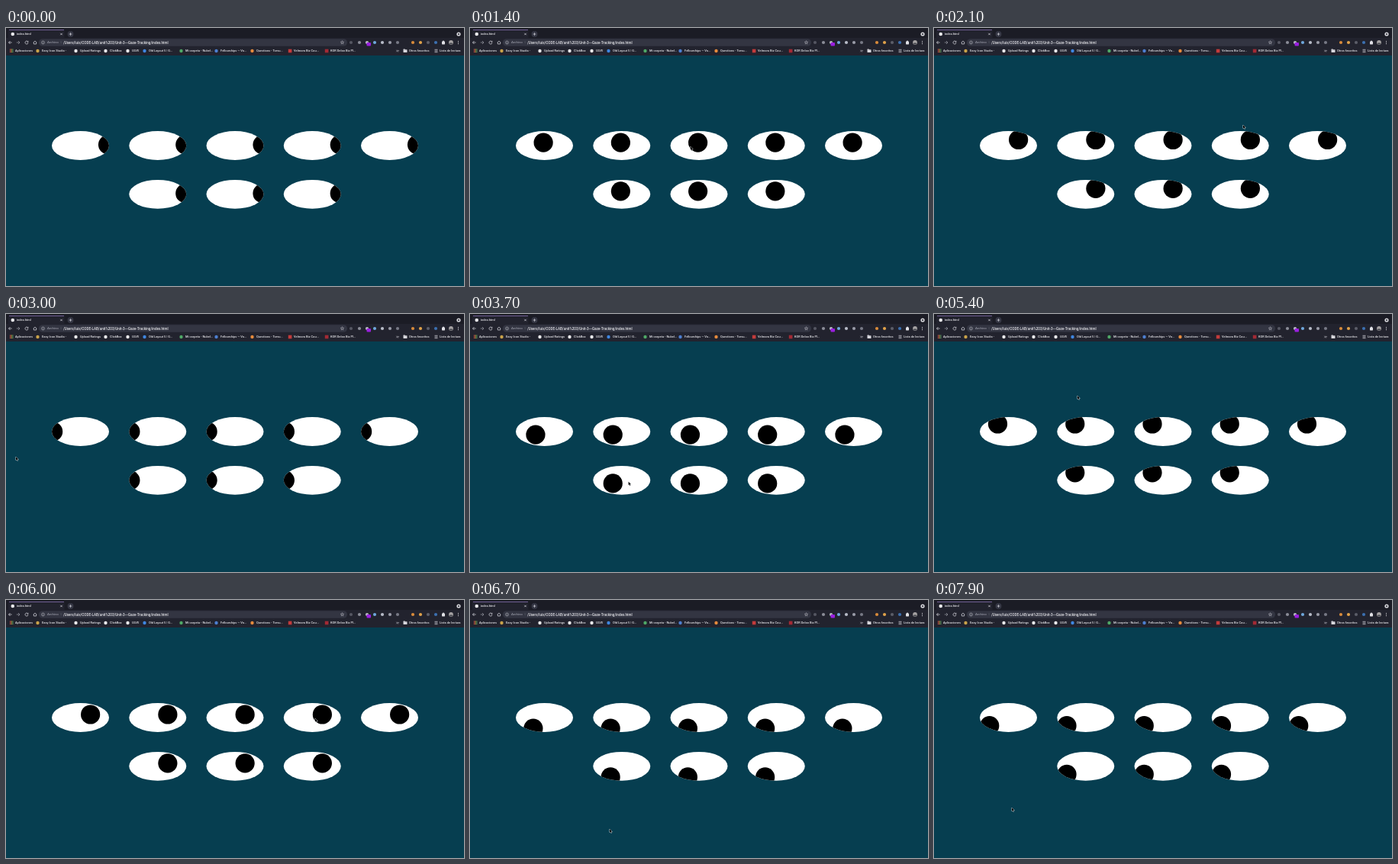
Write an HTML page with a canvas that moves like this. It is 600 by 338 pixels and loops after 8 s.

```html
<!DOCTYPE html>
<html lang="es">
<head>
<meta charset="utf-8">
<title>Eyes</title>
<style>
html, body { margin: 0; width: 100%; height: 100%; overflow: hidden; background: #063e50; }
canvas { display: block; width: 600px; height: 338px; }
</style>
</head>
<body>
<canvas id="stage"></canvas>
<script>
const W = 600, H = 338, TOP = 36, LOOP = 8000, STEP = 100;
const TAU = Math.PI * 2;
const canvas = document.getElementById('stage');
const ctx = canvas.getContext('2d');
const scale = window.devicePixelRatio || 1;
canvas.width = W * scale;
canvas.height = H * scale;
ctx.scale(scale, scale);

// Pointer waypoints: time, x, y
const path = [
  [0, 588, 178], [500, 500, 182], [1000, 345, 178], [1500, 290, 150],
  [2100, 405, 127], [2500, 205, 138], [3000, 13, 187], [3300, 45, 245],
  [3600, 75, 228], [3800, 356, 212], [3900, 356, 212], [4400, 409, 187],
  [4800, 300, 236], [5100, 170, 185], [5400, 188, 107], [5700, 310, 92],
  [6000, 405, 155], [6100, 405, 155], [6400, 325, 260], [6700, 183, 300],
  [7000, 108, 220], [7300, 220, 190], [7600, 225, 312], [7900, 102, 272]
];

function pointerAt(t) {
  let i = 0;
  while (i < path.length - 2 && t >= path[i + 1][0]) i++;
  const a = path[i], b = path[i + 1];
  const before = path[Math.max(0, i - 1)], after = path[Math.min(path.length - 1, i + 2)];
  const span = b[0] - a[0], u = Math.min(1, (t - a[0]) / span);
  const u2 = u * u, u3 = u2 * u;
  return [1, 2].map(k => {
    const m0 = (b[k] - before[k]) / (b[0] - before[0]) * span;
    const m1 = (after[k] - a[k]) / (after[0] - a[0]) * span;
    return (2 * u3 - 3 * u2 + 1) * a[k] + (u3 - 2 * u2 + u) * m0
      + (3 * u2 - 2 * u3) * b[k] + (u3 - u2) * m1;
  });
}

function rect(x, y, w, h, color, r = 0) {
  ctx.fillStyle = color;
  ctx.beginPath();
  ctx.roundRect(x, y, w, h, r);
  ctx.fill();
}

function dot(x, y, r, color) {
  ctx.fillStyle = color;
  ctx.beginPath();
  ctx.arc(x, y, r, 0, TAU);
  ctx.fill();
}

function text(str, x, y, size = 4, color = '#e6e6ea', weight = 500) {
  ctx.fillStyle = color;
  ctx.font = `${weight} ${size}px Roboto, sans-serif`;
  ctx.textBaseline = 'middle';
  ctx.fillText(str, x, y);
}

function stroke(d, x, y, color = '#dcdce2', width = 0.7) {
  ctx.save();
  ctx.translate(x, y);
  ctx.strokeStyle = color;
  ctx.lineWidth = width;
  ctx.stroke(new Path2D(d));
  ctx.restore();
}

const bookmarks = [
  ['Aplicaciones', 12, '#e0524a'], ['Easy Icon Studio -', 47, '#c9a24a'],
  ['Upload Ratings', 97, '#e8e8ea'], ['ClickBox', 136, '#e8e8ea'],
  ['ULVE', 165, '#e8e8ea'], ['Old Layout 5 | G...', 187, '#3f86e0'],
  ['Mi carpeta - Nubel...', 235, '#4fa866'], ['Fellowships — Vo...', 281, '#4d7fd0'],
  ['Questions - Torvu...', 328, '#e58a3c'], ['Velmora Biz Cou...', 377, '#c33b3b'],
  ['KOR Delan Biz Pl...', 425, '#a32a35']
];

const extensions = [
  [452, '#555762'], [463, '#8b8d98'], [473, '#b9bac4'], [483, '#6fa8dc'],
  [493, '#b8bcc8'], [503, '#9a9ca8'], [513, '#777985'], [533, '#d98b3a'],
  [543, '#e0a24a'], [553, '#5c5e69'], [563, '#3c70b0']
];

function drawTabs() {
  rect(0, 0, W, 14, '#1b1c25');
  rect(3, 2, 73.5, 12, '#22232e', 1.5);
  rect(4, 2, 72, 0.8, '#8d74b8');
  dot(8.8, 8, 2.3, '#e8e8ea');
  text('index.html', 14, 8.2);
  stroke('M-1.2-1.2L1.2 1.2M1.2-1.2L-1.2 1.2', 72.5, 8);
  dot(84.5, 8, 4, '#343643');
  stroke('M-1.8 0H1.8M0-1.8V1.8', 84.5, 8);
  dot(593, 8, 2.6, '#d5d5da');
  dot(593, 8, 1, '#1b1c25');
}

function drawToolbar() {
  const y = 19;
  rect(0, 13, W, TOP - 13, '#22232e');
  stroke('M2.2 0H-2M0-2L-2 0L0 2', 5.5, y);
  stroke('M-2.2 0H2M0-2L2 0L0 2', 16, y, '#9d9ea8');
  stroke('M1.6-1.2A2 2 0 1 0 2 .4M2-2.2V-.7H.5', 27, y);
  stroke('M-2.3 .1L0-2L2.3 .1M-1.6-.2V2H1.6V-.2', 38, y);

  rect(43, 14.2, 404, 9.6, '#333542', 4.8);
  stroke('M2 0A2 2 0 1 1-2 0A2 2 0 1 1 2 0M0-.3V1.2M0-1.2V-.8', 48.5, y, '#b8b9c2', 0.6);
  text('Archivo', 54, 19.2, 4.4, '#a9abb7', 400);
  text('|', 71.5, 19.2, 4.4, '#777985', 400);
  text('/Users/luis/CODE-LAB/unit%203/Unit-3---Gaze-Tracking/index.html', 75, 19.2, 4.55);
  stroke('M0-2.3L.6-.7L2.2-.7L.9 .4L1.4 2L0 1L-1.4 2L-.9 .4L-2.2-.7L-.6-.7Z', 440.5, y, '#c8c9d0', 0.5);

  for (const [x, color] of extensions) dot(x, y, 2.1, color);
  rect(472.5, 19, 5.5, 4.5, '#9a1fe0', 1);
  rect(571, 17.6, 4, 3.8, '#e1e1e6', 0.6);
  dot(573, 17.4, 1, '#e1e1e6');
  dot(583, y, 2.9, '#a6a3a4');
  rect(581, 19.5, 4, 2, '#44464e', 1);
  for (let k = -1; k <= 1; k++) dot(592.5, y + k * 1.7, 0.55, '#dcdce2');
}

function drawBookmarks() {
  const y = 30;
  bookmarks.forEach(([label, x, color], i) => {
    if (i === 0) {
      const tints = ['#e0524a', '#e7b840', '#58ad68'];
      for (let k = 0; k < 9; k++) {
        rect(5 + k % 3 * 1.7, y - 2.4 + Math.floor(k / 3) * 1.7, 1.1, 1.1, tints[k % 3]);
      }
    } else if (i > 8) {
      rect(x - 7.2, y - 2.3, 4.6, 4.6, color);
    } else {
      dot(x - 5.5, y, 2.2, color);
    }
    text(label, x, y + 0.2);
  });
  stroke('M-1.5-1.2L-.3 0L-1.5 1.2M.3-1.2L1.5 0L.3 1.2', 513, y);
  rect(520.5, 28.3, 5, 3.8, '#d8d8dd', 0.5);
  rect(520.5, 27.6, 2.3, 1.2, '#d8d8dd', 0.3);
  text('Otros favoritos', 528, y + 0.2);
  stroke('M-2-1.7H2M-2 0H2M-2 1.7H2', 563.5, y);
  text('Lista de lectura', 568, y + 0.2);
}

function drawEye(left, top, fx, fy) {
  const w = 75, h = 37.8;
  ctx.save();
  ctx.beginPath();
  ctx.ellipse(left + w / 2, top + h / 2, w / 2, h / 2, 0, 0, TAU);
  ctx.fillStyle = '#fff';
  ctx.fill();
  ctx.clip();
  dot(left + w * fx, top + h * fy, 12.6, '#000');
  ctx.restore();
}

function drawPointer(x, y) {
  ctx.save();
  ctx.translate(x, y);
  const arrow = new Path2D('M0 0V4.5L1 3.6L1.8 5.3L2.6 4.9L1.8 3.3H3.2Z');
  ctx.lineWidth = 0.8;
  ctx.strokeStyle = '#e8eef0';
  ctx.stroke(arrow);
  ctx.fillStyle = '#000';
  ctx.fill(arrow);
  ctx.restore();
}

function draw(t) {
  const [x, y] = pointerAt(t);
  rect(0, 0, W, H, '#063e50');
  drawTabs();
  drawToolbar();
  drawBookmarks();
  for (let i = 0; i < 8; i++) {
    const row = i < 5 ? 0 : 1;
    const col = row ? i - 4 : i;
    drawEye(60 + col * 101.25, 135.1 + row * 63.8, x / W, (y - TOP) / (H - TOP));
  }
  if (t > 0) drawPointer(x, y);
}

function tick(now) {
  draw(Math.floor(now % LOOP / STEP) * STEP);
  requestAnimationFrame(tick);
}
draw(0);
requestAnimationFrame(tick);
</script>
</body>
</html>
```
